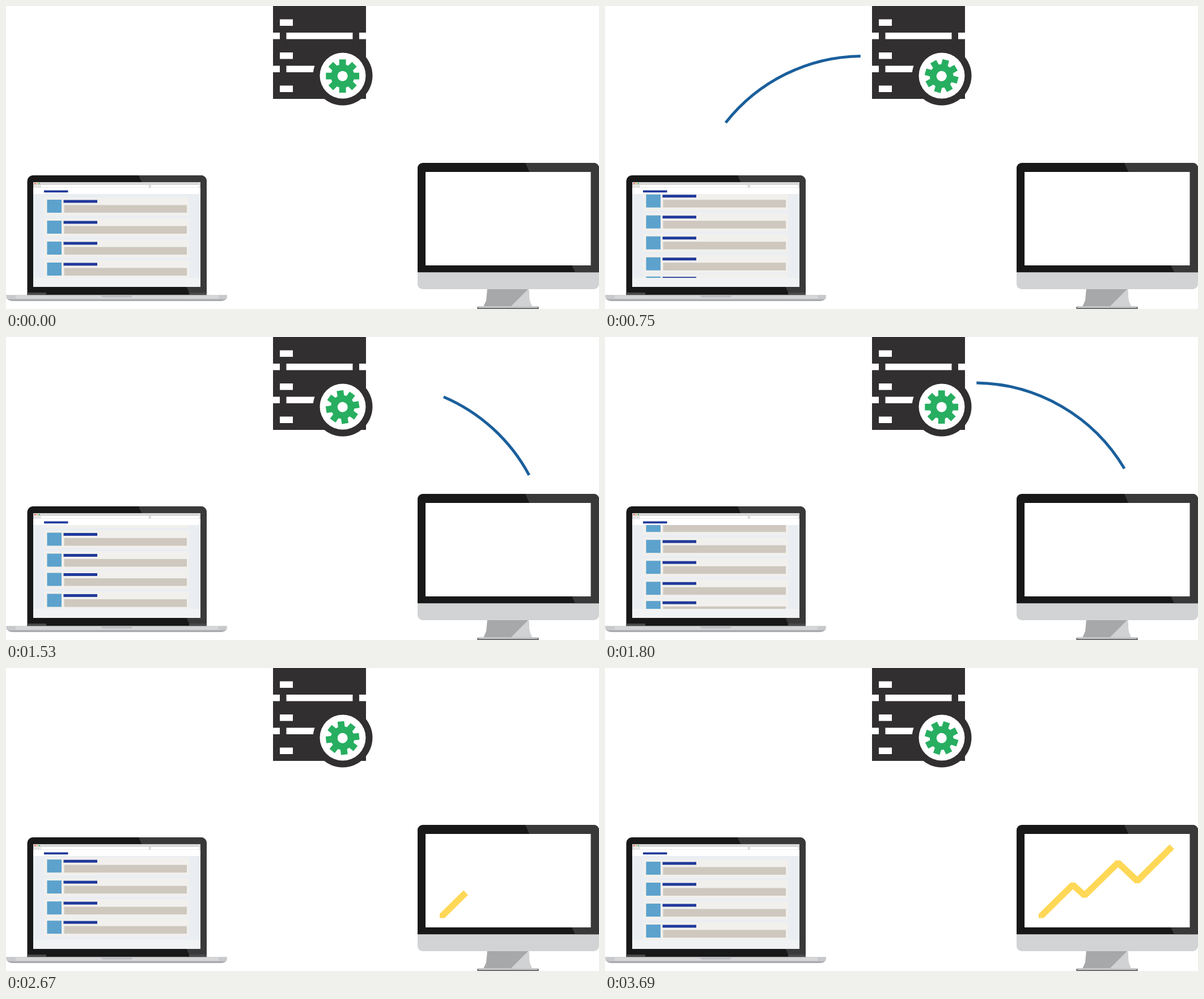
These frames come from a looping animation (1046 px wide and 535 px high, 3.72 s). An HTML page with a canvas:

```html
<!DOCTYPE html>
<html lang="en">
<head>
<meta charset="utf-8">
<title>Feed to chart</title>
<style>
html, body { margin: 0; width: 100%; height: 100%; overflow: hidden; background: #fff; }
canvas { display: block; }
</style>
</head>
<body>
<canvas id="stage" width="1046" height="535"></canvas>
<script>
const ctx = document.getElementById('stage').getContext('2d');
const LOOP = 3720, STEP = 30, RAD = Math.PI / 180;
const DARK = '#322f30', BLACK = '#181818', GLOSS = '#3a3939', NAVY = '#20399a';

const clamp = x => Math.min(1, Math.max(0, x));
const phase = (t, start, span) => clamp((t - start) / span);
const smooth = x => x * x * (3 - 2 * x);
const cubic = x => x < .5 ? 4 * x ** 3 : 1 - 4 * (1 - x) ** 3;

// cubic-bezier(.3, .3, .3, 1), solved by bisection
function glide(x) {
  if (x <= 0 || x >= 1) return clamp(x);
  const at = (u, a, b) => 3 * u * (1 - u) ** 2 * a + 3 * u * u * (1 - u) * b + u ** 3;
  let lo = 0, hi = 1;
  for (let i = 0; i < 20; i++) {
    const mid = (lo + hi) / 2;
    if (at(mid, .3, .3) < x) lo = mid; else hi = mid;
  }
  return at(lo, .3, 1);
}

function rect(x, y, x2, y2, color) {
  ctx.fillStyle = color;
  ctx.fillRect(x, y, x2 - x, y2 - y);
}

function rounded(x, y, x2, y2, radii, color) {
  ctx.beginPath();
  ctx.roundRect(x, y, x2 - x, y2 - y, radii);
  ctx.fillStyle = color;
  ctx.fill();
}

function poly(points, color) {
  ctx.beginPath();
  points.forEach(p => ctx.lineTo(...p));
  ctx.closePath();
  ctx.fillStyle = color;
  ctx.fill();
}

function disc(x, y, r, color) {
  ctx.beginPath();
  ctx.arc(x, y, r, 0, 7);
  ctx.fillStyle = color;
  ctx.fill();
}

function clipped(x, y, x2, y2, radii, draw) {
  ctx.save();
  ctx.beginPath();
  ctx.roundRect(x, y, x2 - x, y2 - y, radii);
  ctx.clip();
  draw();
  ctx.restore();
}

function server() {
  rect(471, 0, 635, 47, DARK);
  rect(471, 58.5, 635, 105.5, DARK);
  rect(471, 117, 635, 164, DARK);
  rect(483, 47, 494.5, 117, DARK);
  rect(611.5, 47, 623, 117, DARK);
  for (const y of [23.5, 82, 140.5]) rect(483, y, 506, y + 11.5, '#fff');
  disc(594, 123, 52.5, DARK);
  disc(594, 123, 40.5, '#fff');
}

function gear(t) {
  ctx.save();
  ctx.translate(593.7, 123.7);
  ctx.rotate(t * .2 * RAD);
  disc(0, 0, 20.8, '#27ae60');
  for (let i = 0; i < 8; i++) {
    rect(-5.9, -29.4, 5.9, -16, '#27ae60');
    ctx.rotate(45 * RAD);
  }
  disc(0, 0, 9, '#fff');
  ctx.restore();
}

function post(y) {
  rect(67, y - 4, 323, y + 28, '#f1f0ed');
  rect(72.5, y, 98, y + 23, '#5ca2cd');
  rect(101.5, y + .5, 161, y + 5.5, NAVY);
  rect(102.5, y + 9.5, 319, y + 23, '#cec8bf');
}

// The feed moves down by one block of four posts, three times.
function feed(t) {
  const block = 145;
  const start = [30, 1216, 2225].filter(s => t >= s).pop();
  const shift = start === undefined ? block : block * glide(phase(t, start, 1060));
  clipped(48, 332, 343, 480, 0, () => {
    for (const top of [342 + shift, 342 + shift - block])
      for (let i = 0; i < 4; i++) post(top + i * 37);
  });
}

function browser(t) {
  rect(48, 311, 343, 496, '#f0f2f4');
  rect(48, 332, 343, 480, '#eaeef2');
  rect(48, 311, 343, 321, '#d9d8d8');
  ['#ee5a52', '#e5bd4f', '#4fbb68'].forEach((c, i) => disc(51.2 + i * 3.8, 313.5, 1.3, c));
  rounded(50, 316.3, 59.5, 320.3, 1, '#f3f3f3');
  rect(52, 318, 53.5, 319, '#999');
  rect(56, 318, 57.5, 319, '#999');
  rounded(61, 316, 252, 320.5, 1, '#fff');
  rounded(255.5, 316, 341, 320.5, 1, '#fff');
  rect(48, 321, 343, 332, '#fff');
  rect(67, 325.5, 109.5, 329.2, NAVY);
  feed(t);
}

function laptop(t) {
  clipped(37.5, 299, 354, 512, [10, 10, 0, 0], () => {
    rect(37, 299, 354, 512, BLACK);
    poly([[234, 299], [354, 299], [354, 506], [323, 506]], GLOSS);
    rect(37, 506, 354, 512, '#4a4a4b');
    rect(71, 506, 323, 509.5, '#161616');
  });
  browser(t);
  rounded(0.5, 510.5, 390, 521, [1, 1, 12, 12], '#a9abae');
  rounded(0.5, 510.5, 390, 517.5, [1, 1, 5, 5], '#d4d6d8');
  rect(1, 510.5, 17, 517, '#c7c9cc');
  rect(375, 510.5, 389.5, 517, '#c7c9cc');
  rounded(168, 510.5, 223, 514.5, [0, 0, 4, 4], '#bcbec1');
}

function monitor() {
  poly([[849, 499], [922, 499], [923.5, 520], [928, 531], [842, 531], [847, 520]], '#a7a8aa');
  poly([[922, 499], [923.5, 520], [928, 531], [889, 532]], '#d1d2d4');
  rounded(831, 530.5, 940, 535, [4, 4, 2, 2], '#6f7072');
  rounded(833, 530, 938, 533, 3, '#c6c7c9');
  clipped(726, 277, 1046, 500, 9, () => {
    rect(726, 277, 1046, 470.5, BLACK);
    poly([[916, 277], [1046, 277], [1046, 470.5], [1004, 470.5]], GLOSS);
    rect(726, 470.5, 1046, 500, '#d1d3d4');
  });
  rect(740, 293, 1031.5, 458, '#fff');
}

// Grows from angle a to b, then its tail catches up.
function link(t, x, y, a, b) {
  const head = smooth(phase(t, 0, 660)), tail = smooth(phase(t, 580, 660));
  if (head <= tail) return;
  const at = p => (a + (b - a) * p) * RAD;
  ctx.beginPath();
  ctx.arc(x, y, 308, at(tail), at(head), b < a);
  ctx.strokeStyle = '#1a5f9c';
  ctx.lineWidth = 5;
  ctx.stroke();
}

function chart(t) {
  const p = cubic(phase(t, 2295, 1005));
  if (!p) return;
  const pts = [[762, 445], [825, 383], [846, 401.5], [905, 343.8], [939, 376], [1000, 315.5]];
  const dist = (a, b) => Math.hypot(b[0] - a[0], b[1] - a[1]);
  let left = p * pts.slice(1).reduce((sum, q, i) => sum + dist(pts[i], q), 0);
  clipped(765, 293, 1031, 441.5, 0, () => {
    ctx.beginPath();
    ctx.moveTo(...pts[0]);
    for (let i = 1; i < pts.length && left > 0; i++) {
      const [a, b] = [pts[i - 1], pts[i]], len = dist(a, b), k = Math.min(1, left / len);
      ctx.lineTo(a[0] + (b[0] - a[0]) * k, a[1] + (b[1] - a[1]) * k);
      left -= len;
    }
    ctx.strokeStyle = '#ffd857';
    ctx.lineWidth = 11.4;
    ctx.lineJoin = 'bevel';
    ctx.stroke();
  });
}

function draw(now) {
  const t = Math.floor((now % LOOP) / STEP) * STEP;
  rect(0, 0, 1046, 535, '#fff');
  server();
  gear(t);
  laptop(t);
  monitor();
  link(t, 455, 396.4, 208.1, 269.2);
  link(t - 1140, 651, 389, -28.1, -89.2);
  chart(t);
}

let origin;
function tick(now) {
  origin ??= now;
  draw(Math.max(0, now - origin));
  requestAnimationFrame(tick);
}
draw(0);
requestAnimationFrame(tick);
</script>
</body>
</html>
```
